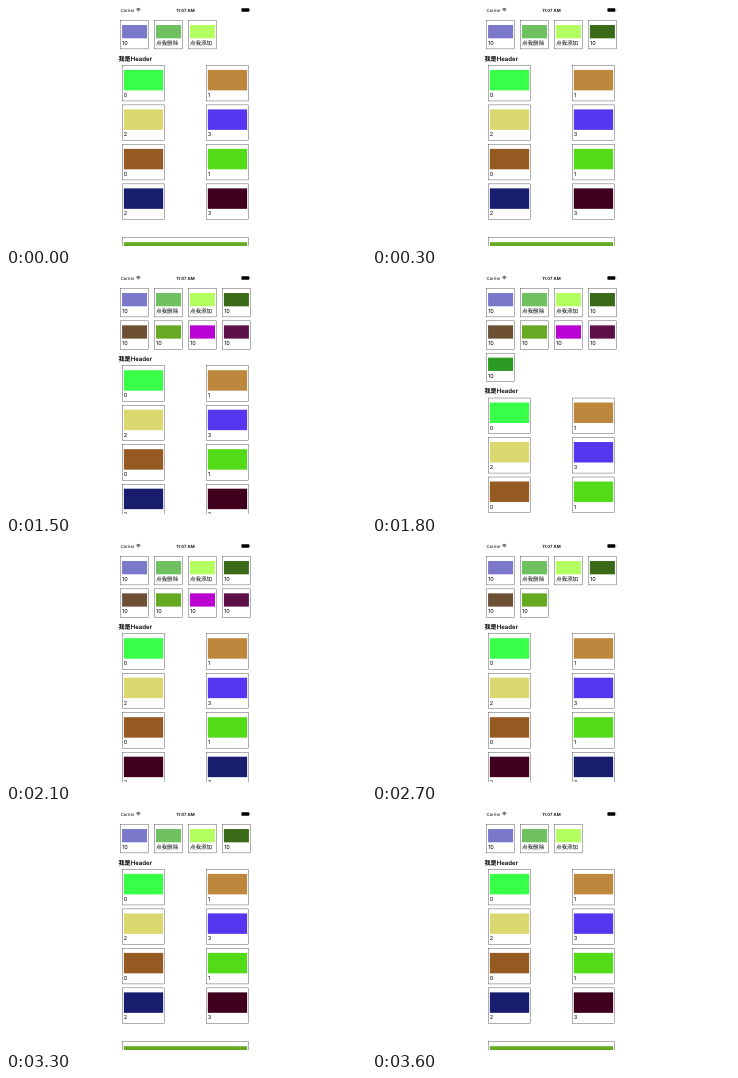
These frames come from a looping animation (360x240 px, 3900 ms). An HTML page:

```html
<!DOCTYPE html>
<html lang="zh">
<head>
<meta charset="utf-8">
<style>
  html, body { margin: 0; width: 100%; height: 100%; overflow: hidden; background: #fff; }
  svg { display: block; width: 100vw; height: 100vh; }
  text {
    font-family: Inter, "Noto Sans CJK SC", "Noto Sans CJK", sans-serif;
    text-rendering: geometricPrecision;
  }
</style>
</head>
<body>
<svg viewBox="0 0 360 240">
  <!-- A 375 point wide screen, centred on the stage -->
  <g transform="translate(112.5 0) scale(.3573 .359)">
    <g id="status">
      <text x="5.5" y="15.5" font-size="12">Carrier</text>
      <g fill="none" stroke="#000" stroke-width="2.2">
        <path d="M50 9.4a7.6 7.6 0 0 1 11 0M52.2 12a4.6 4.6 0 0 1 6.6 0"/>
      </g>
      <path d="M53.8 13.4a2.4 2.4 0 0 1 3.4 0L55.5 15.6z"/>
      <text x="187.5" y="15.5" font-size="12" font-weight="600" text-anchor="middle">11:07 AM</text>
      <rect x="344" y="6.5" width="22" height="9.5" rx="2"/>
      <rect x="367" y="9.5" width="1.8" height="3.5" rx=".9"/>
    </g>
    <g id="content"></g>
  </g>
</svg>
<script>
const STEP = 300;
const LOOP = 3900;
const MAX_STEP = 6;
const content = document.getElementById('content');

const smallColors = ['#7b78cb', '#6fc060', '#b4ff60', '#3a6a17', '#6d5033',
                     '#66a922', '#ba00d2', '#5d0f4a', '#2b9a23'];
const largeColors = ['#38ff48', '#bd873d', '#dcd870', '#5636ef',
                     '#955a22', '#53db18', '#191d6e', '#40001d'];
const buttonLabels = { 1: '点我删除', 2: '点我添加' };

function cell(x, y, w, h, color, label) {
  return `<rect x="${x + .5}" y="${y + .5}" width="${w - 1}" height="${h - 1}" fill="none" stroke="#222"/>
    <rect x="${x + 5}" y="${y + 13}" width="${w - 10}" height="${h - 43}" fill="${color}"/>
    <text x="${x + 5}" y="${y + h - 11.5}" font-size="15.5">${label}</text>`;
}

function screen(step) {
  const count = 3 + MAX_STEP - Math.abs(MAX_STEP - step);
  const shift = 90 * (Math.ceil(count / 4) - 1);
  const swapped = step >= 7 && step <= 9;

  const small = smallColors.slice(0, count).map((color, i) =>
    cell(5 + 95 * (i % 4), 40 + 90 * Math.floor(i / 4), 80, 80, color, buttonLabels[i] || '10'));

  const large = largeColors.map((_, i) => {
    // The reused last pair trades colours while items are removed
    const color = largeColors[swapped && i > 5 ? 13 - i : i];
    return cell(10 + 235 * (i % 2), 165 + shift + 110 * Math.floor(i / 2), 120, 100, color, i % 4);
  });

  const header = `<text x="0" y="${152 + shift}" font-size="17" font-weight="600">我是Header</text>`;
  const wide = cell(10, 645 + shift, 355, 100, '#66a922', '0');
  return small.join('') + header + large.join('') + wide;
}

let shown = -1;
const start = performance.now();
function draw(now) {
  const step = Math.floor(Math.max(0, now - start) % LOOP / STEP);
  if (step !== shown) {
    content.innerHTML = screen(step);
    shown = step;
  }
  requestAnimationFrame(draw);
}
draw(start);
</script>
</body>
</html>
```
